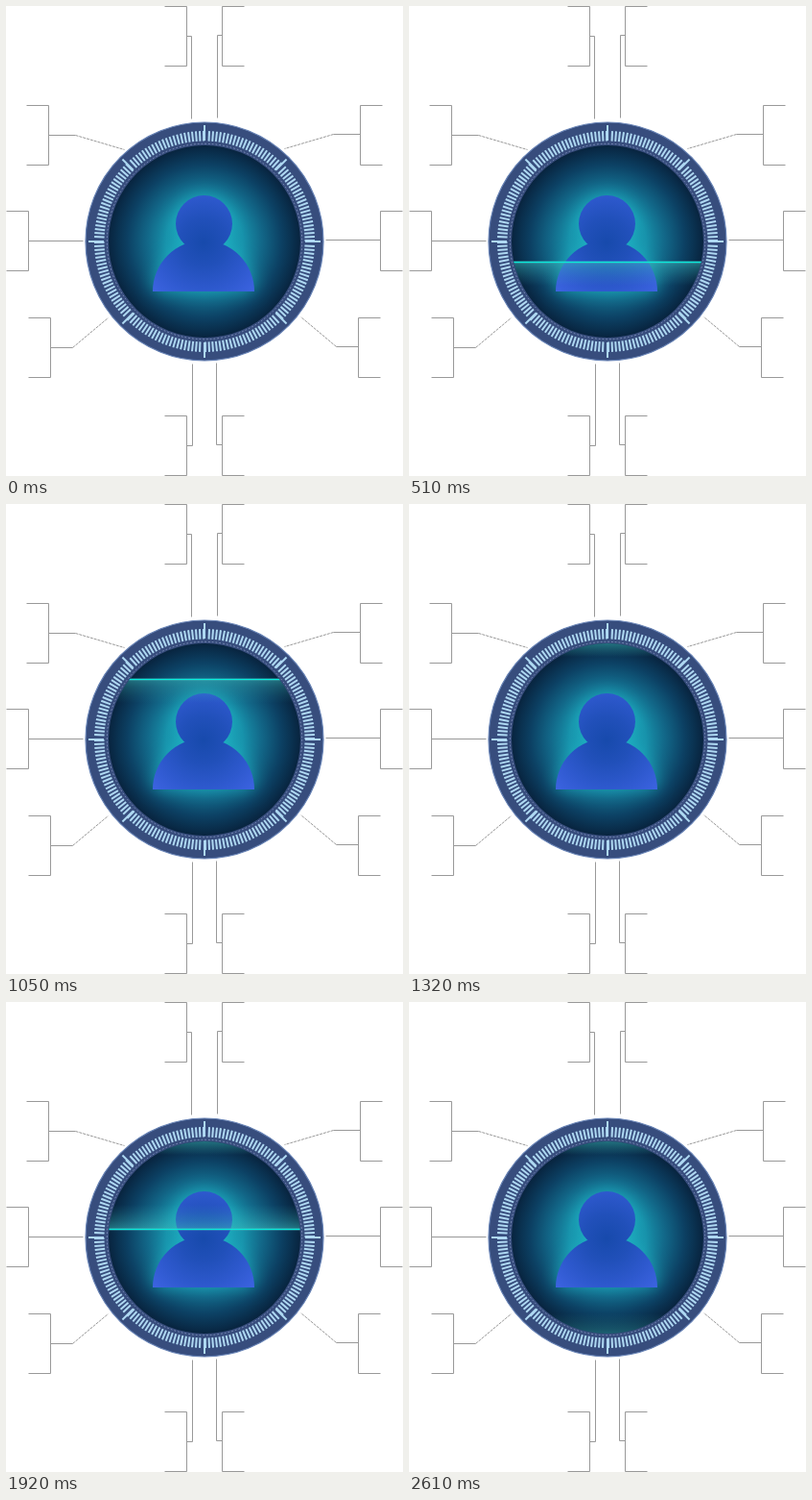
Recreate the animation shown at these times as an HTML page with a canvas. Size 414 by 489 pixels, loop 2640 ms.

```html
<!DOCTYPE html>
<html lang="en">
<head>
<meta charset="utf-8">
<title>Profile scan</title>
<style>
  html, body { margin: 0; width: 100%; height: 100%; overflow: hidden; background: #fff; }
  canvas { display: block; }
</style>
</head>
<body>
<canvas id="stage" width="414" height="489"></canvas>
<script>
const ctx = document.getElementById('stage').getContext('2d');
const CX = 207, CY = 245, LENS = 100, TAU = Math.PI * 2;
const STEP = 30, STEPS = 88, TURN = STEPS / 2;
const ARM = 23, HALF = 31, TRAIL = 25;

// Left-hand brackets; the right-hand ones mirror them.
const brackets = [
  { spine: 188, top: 0, elbow: 193, end: [193, 117] },
  { spine: 44, top: 103, elbow: 72, end: [123, 149] },
  { spine: 23, top: 213, elbow: 23, end: [80, 244] },
  { spine: 46, top: 324, elbow: 69, end: [106, 324] },
  { spine: 188, top: 426, elbow: 194, end: [194, 372] }
];

function gradient(g, colors) {
  colors.forEach((color, i) => g.addColorStop(i / (colors.length - 1), color));
  return g;
}
const radial = (x, y, r, colors) => gradient(ctx.createRadialGradient(x, y, 0, x, y, r), colors);
const vertical = (y1, y2, colors) => gradient(ctx.createLinearGradient(0, y1, 0, y2), colors);
const teal = alpha => `rgba(60, 190, 190, ${alpha})`;

function line(x1, y1, x2, y2) {
  ctx.beginPath();
  ctx.moveTo(x1, y1);
  ctx.lineTo(x2, y2);
  ctx.stroke();
}

function disc(r, fill) {
  ctx.beginPath();
  ctx.arc(CX, CY, r, 0, TAU);
  ctx.fillStyle = fill;
  ctx.fill();
}

function band(y1, y2, colors) {
  ctx.fillStyle = vertical(y1, y2, colors);
  ctx.fillRect(CX - LENS, Math.min(y1, y2), LENS * 2, Math.abs(y2 - y1));
}

function drawBracket({ spine, top, elbow, end: [endX, endY] }, mirrored) {
  const px = x => (mirrored ? 413 - x : x) + .5;
  const segment = (x1, y1, x2, y2) => {
    const sloped = x1 !== x2 && y1 !== y2;
    ctx.setLineDash(sloped ? [3, 1] : []);
    line(px(x1), y1 + .5, px(x2), y2 + .5);
  };
  const bottom = top + HALF * 2, shift = mirrored ? 1 : 0;
  const mid = top + HALF - shift;
  segment(spine - ARM, top, spine, top);
  segment(spine, top, spine, bottom);
  segment(spine, bottom, spine - ARM, bottom);
  segment(spine, mid, elbow, mid);
  segment(elbow, mid, endX, endY - shift);
  ctx.setLineDash([]);
}

function drawTick(degrees, inner, outer) {
  const a = degrees * TAU / 360, c = Math.cos(a), s = Math.sin(a);
  line(CX + c * inner, CY + s * inner, CX + c * outer, CY + s * outer);
}

function drawDial() {
  disc(124, '#374d7d');
  ctx.strokeStyle = '#6682b5';
  ctx.lineWidth = 1.2;
  ctx.stroke();

  ctx.strokeStyle = '#aed8f2';
  ctx.lineWidth = 2;
  for (let major = 0; major < 360; major += 45) {
    drawTick(major, 105, 121);
    for (let minor = 2.5; minor < 45; minor += 2) drawTick(major + minor, 104.5, 115);
  }

  disc(LENS, radial(CX, CY, LENS,
    ['#1ba6ba', '#1a9fb5', '#1791aa', '#126788', '#0c4164', '#08243f']));
  ctx.strokeStyle = '#8193bd';
  ctx.lineWidth = 1;
  ctx.setLineDash([1.6, 2.2]);
  ctx.beginPath();
  ctx.arc(CX, CY, 101.7, 0, TAU);
  ctx.stroke();
  ctx.setLineDash([]);
}

function drawPerson() {
  ctx.beginPath();
  ctx.arc(206.5, 226.5, 29.5, 0, TAU);
  ctx.moveTo(153, 297);
  ctx.arc(206, 297, 53, Math.PI, TAU);
  ctx.closePath();
  ctx.fillStyle = radial(206, 246, 74, ['#174aac', '#2150ba', '#2e59ce', '#3d64e2']);
  ctx.save();
  ctx.shadowColor = 'rgba(32, 190, 205, .6)';
  ctx.shadowBlur = 18;
  ctx.fill();
  ctx.restore();
}

function drawScan(step) {
  const rising = step < TURN;
  const y = Math.round(rising ? 140 + (TURN - step) * 14 / 3 : 138 + (step - TURN) * 4.9);
  const tail = rising ? y + TRAIL : y - TRAIL;

  // The upper rim keeps glowing once the beam has touched it.
  if (!rising) band(CY - LENS, CY - LENS + 14, [teal(.5), teal(0)]);
  band(y, tail, [teal(.5), teal(.28), teal(.12), teal(0)]);
  band(y - 1, y + 2, [teal(.4), teal(.4)]);
  band(y, y + 1, ['#06ecdc', '#06ecdc']);
}

function render(now) {
  const step = Math.floor(now / STEP) % STEPS;
  ctx.fillStyle = '#fff';
  ctx.fillRect(0, 0, 414, 489);
  ctx.strokeStyle = '#999';
  ctx.lineWidth = 1;
  for (const bracket of brackets) {
    drawBracket(bracket, false);
    drawBracket(bracket, true);
  }
  drawDial();
  ctx.save();
  ctx.beginPath();
  ctx.arc(CX, CY, LENS, 0, TAU);
  ctx.clip();
  drawPerson();
  if (step > 0) drawScan(step);
  ctx.restore();
}

const start = performance.now();
function tick() {
  render(performance.now() - start);
  requestAnimationFrame(tick);
}
tick();
</script>
</body>
</html>
```
